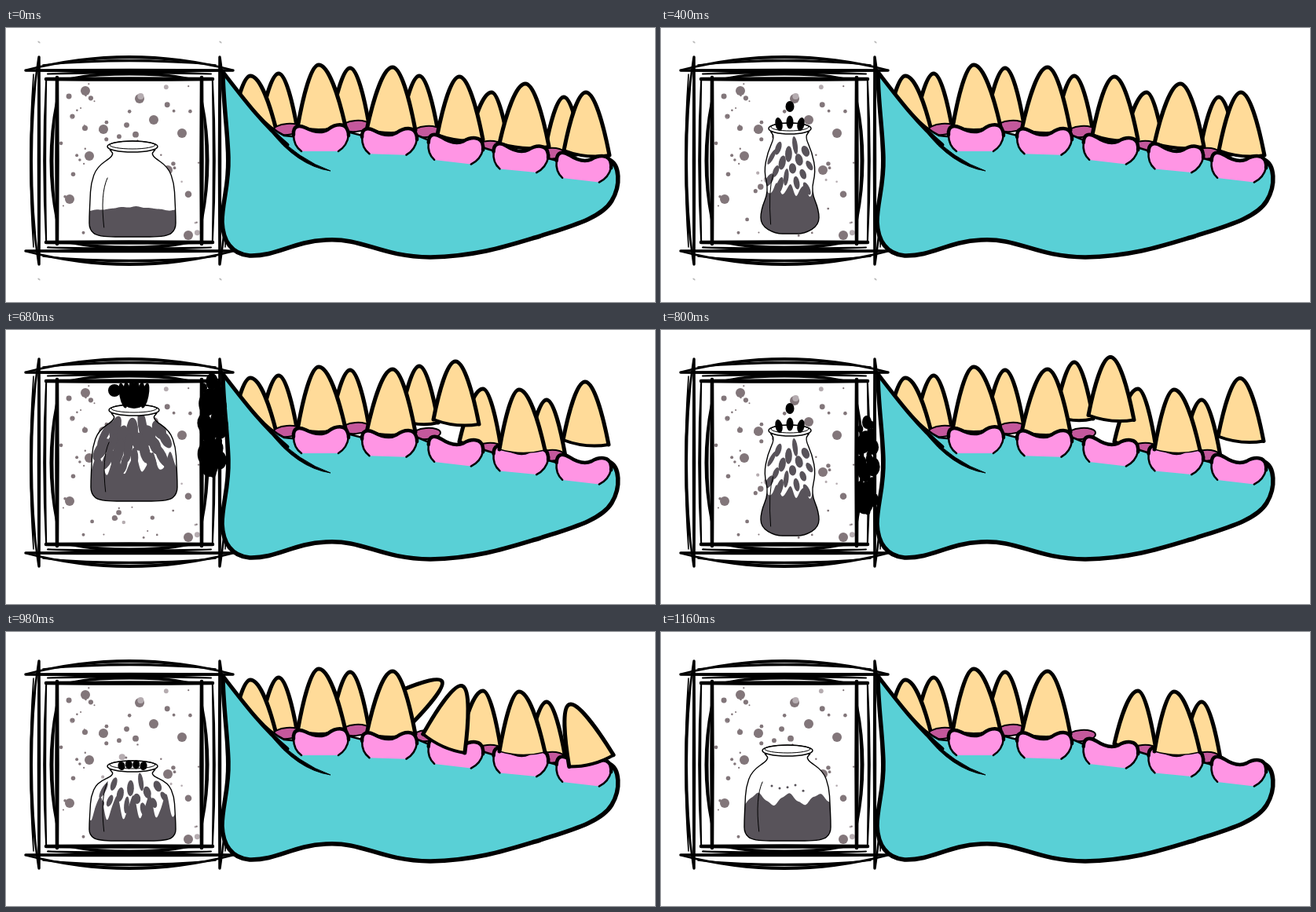
These frames come from a looping animation (826x349 px, 1.29 s). An HTML page with a canvas:

```html
<!DOCTYPE html>
<html>
<head>
<meta charset="utf-8">
<style>
html, body { margin: 0; width: 100%; height: 100%; overflow: hidden; background: #fff; }
canvas { display: block; }
</style>
</head>
<body>
<canvas id="stage" width="826" height="349"></canvas>
<script>
const g = document.getElementById('stage').getContext('2d');
const LOOP = 1290;
const BLUE = '#59d0d6', IVORY = '#ffdb99', PINK = '#ff95e4', PLUM = '#c4589c';
const LIQUID = '#58535a', SPECK = '#82767a', PALE = '#b5acb0';

const lerp = (a, b, u) => a + (b - a) * u;
const random = n => {
  const v = Math.sin(n * 12.9898) * 43758.5453;
  return v - Math.floor(v);
};

// Keys are [step, ...values]; the values between them are interpolated.
function track(step, keys) {
  const next = keys.findIndex(key => step <= key[0]);
  if (next < 1) return keys[next ? keys.length - 1 : 0].slice(1);
  const a = keys[next - 1], b = keys[next];
  const u = (step - a[0]) / (b[0] - a[0]);
  return a.slice(1).map((v, n) => lerp(v, b[n + 1], u));
}

function paint(path, fill, line, width = 5) {
  if (fill) { g.fillStyle = fill; g.fill(path); }
  if (line) { g.strokeStyle = line; g.lineWidth = width; g.stroke(path); }
}

function blob(x, y, rx, ry = rx, turn = 0, color = '#000') {
  g.fillStyle = color;
  g.beginPath();
  g.ellipse(x, y, rx, ry, turn, 0, 7);
  g.fill();
}

// A curved stroke that swells by "swell" in the middle; its ends are "tip" wide.
function brush(x1, y1, cx, cy, x2, y2, swell, tip = 2) {
  const len = Math.hypot(x2 - x1, y2 - y1);
  const nx = -(y2 - y1) / len * swell, ny = (x2 - x1) / len * swell;
  const p = new Path2D();
  p.moveTo(x1, y1);
  p.quadraticCurveTo(cx + nx, cy + ny, x2, y2);
  p.quadraticCurveTo(cx - nx, cy - ny, x1, y1);
  paint(p, '#000', '#000', tip);
}

function smooth(path, pts) {
  for (let i = 0; i < pts.length - 1; i++) {
    const [x, y] = pts[i], [p, q] = pts[i + 1];
    path.quadraticCurveTo(x, y, (x + p) / 2, (y + q) / 2);
  }
  path.lineTo(...pts[pts.length - 1]);
}

/* ---------- picture box ---------- */

const BIG_SPECKS = [[101, 80], [170, 90], [188, 117], [124, 129], [224, 134], [106, 163],
  [206, 181], [81, 218], [232, 264]];

function drawSpecks() {
  for (const [x, y] of BIG_SPECKS) blob(x, y, 6, 6, 0, SPECK);
  for (let i = 1; i <= 75; i++) {
    const r = 1 + 3.5 * random(i + 300) ** 3;
    blob(lerp(70, 246, random(i)), lerp(71, 266, random(i + 150)), r, r, 0, i % 5 ? SPECK : PALE);
  }
}

// One wall seen as the top one: y is the distance from the middle of the box.
function drawWall(turn, inner, bow) {
  const line = (y, reach, bend, swell, tip) => brush(-reach, -y, 0, -y - bend, reach, -y, swell, tip);
  g.save();
  g.translate(157, 169);
  g.rotate(turn);
  line(115, 132, 0, 1, 3.5);
  line(116, 130, bow * 2, 2, 2);
  line(122, 110, bow * 0.7, 2, 1.5);
  line(inner, 106, 0, 1, 4.5);
  line(inner + 1, 75, 12, 3, 2);
  line(lerp(inner, 115, 0.6), 104, 4, 2, 2);
  g.restore();
}

function drawBox(step) {
  for (let side = 0; side < 4; side++)
    drawWall(side * Math.PI / 2, side % 2 ? 92 : 104, side % 2 ? 9 : 16);
  if (step < 1) {
    for (const x of [42, 273])
      for (const y of [18, 320]) blob(x, y, 2, 1, 0.7, '#bbb');
  }
}

/* ---------- jar ---------- */

// The surface is a wave around "level" that peaks in the middle and every "gap" pixels.
const REST = { cx: 161, lip: 149, bottom: 266, rim: 32, shoulder: 53, waist: 54, hip: 55, round: 0.8,
  level: 230, wave: 3, gap: 110 };
const SETTLING = { ...REST, level: 213, wave: 9, gap: 39, drops: 5 };
const SQUASH = { ...REST, lip: 169, level: 239, wave: 2 };
const LANDED = { ...SQUASH, level: 223, wave: 19, gap: 21, drips: 15, fat: 4, nubs: 4, rise: 1 };
const STRETCH = { cx: 164, lip: 126, bottom: 262, rim: 27, shoulder: 33, waist: 27, hip: 37, round: 0.5,
  level: 206, wave: 9, gap: 17, drips: 18, fat: 4, nubs: 3, rise: 6 };
const TOP = { ...REST, cx: 163, lip: 100, bottom: 218, level: 170, wave: 15, gap: 23,
  drips: 22, fat: 7, nubs: 6, rise: 19 };

function jarState(t, step) {
  if (t < 200) return [REST, 0];
  if (t < 400) return [SQUASH, 0];
  if (step > 22) return [SETTLING, 0];
  if (step > 16) return [LANDED, 0];
  return [[STRETCH, 0], [TOP, 10], [TOP, 0], [TOP, 8], [STRETCH, 0], [LANDED, 0]][step % 6];
}

function jarOutline({ cx, lip, bottom, rim, shoulder, waist, hip, round }) {
  const at = u => lerp(lip, bottom, u);
  const half = [[rim * 0.9, lip + 6], [rim * 0.72, lip + 13], [shoulder * 0.86, at(0.24)],
    [shoulder, at(0.42)], [waist, at(0.6)], [hip, at(0.78)], [hip, at(0.92)],
    [hip * round, bottom], [0, bottom]];
  const path = new Path2D();
  path.moveTo(cx + half[0][0], half[0][1]);
  smooth(path, half.map(([r, y]) => [cx + r, y]));
  smooth(path, half.reverse().map(([r, y]) => [cx - r, y]));
  path.closePath();
  return path;
}

function drawLiquid({ cx, lip, bottom, shoulder, level, wave, gap, drips = 0, fat, drops = 0 }) {
  const surface = new Path2D();
  surface.moveTo(cx - 60, bottom + 5);
  for (let dx = -60; dx <= 60; dx++) {
    const uneven = 0.75 + 0.25 * Math.sin(dx * 0.31);
    surface.lineTo(cx + dx, level - wave * uneven * Math.cos(dx / gap * 2 * Math.PI));
  }
  surface.lineTo(cx + 60, bottom + 5);
  paint(surface, LIQUID);
  for (let i = 0; i < drips; i++) {
    const dx = ((i * 0.618) % 1 - 0.5) * 1.7 * shoulder;
    const y = lerp(lip + 18, level + 4, (i + 0.5) / drips);
    blob(cx + dx, y, fat * lerp(0.6, 1.2, random(i + 7)), fat * lerp(1.5, 3, random(i + 40)),
      -dx / shoulder * 0.7, LIQUID);
  }
  for (let i = 0; i < drops; i++)
    blob(cx - 20 + i * 10, level - 8 - 16 * random(i + 3), 1.5, 1.5, 0, LIQUID);
}

function drawSplash({ cx, lip, nubs = 0, rise }) {
  for (let i = 0; i < nubs; i++) {
    const u = i / (nubs - 1) - 0.5;
    blob(cx + u * 28, lip - rise + 5 * Math.abs(u), 4.5, 5 + rise * 0.6, u * 0.4);
  }
  if (rise > 3) blob(cx, lip - 26, 5.5, 7);
  if (rise > 10) {
    blob(cx, lip - 9, 13, 9);
    blob(cx - 25, lip - 23, 8, 8);
  }
}

function drawJar(pose, dy) {
  const { cx, lip, rim, hip, bottom } = pose;
  const body = jarOutline(pose);
  g.save();
  g.translate(0, dy);
  paint(body, '#fff');
  g.save();
  g.clip(body);
  drawLiquid(pose);
  g.restore();
  paint(body, null, '#000', 1.4);

  const ring = new Path2D();
  ring.ellipse(cx, lip + 2, rim, 7, 0, 0, 7);
  paint(ring, '#fff', '#000', 1.5);
  const mouth = new Path2D();
  mouth.ellipse(cx, lip, rim - 3, 5, 0, 0, 7);
  paint(mouth, null, '#000', 1);
  const shine = new Path2D();
  shine.moveTo(cx - hip * 0.58, bottom - 75);
  shine.quadraticCurveTo(cx - hip * 0.75, bottom - 55, cx - hip * 0.66, bottom - 12);
  paint(shine, null, '#000', 1);
  drawSplash(pose);
  g.restore();
}

/* ---------- ink running down the wall ---------- */

function drawInk(step) {
  if (step < 4 || step > 16) return;
  const [head, tail, width] = track(step, [[4, 100, 62, 14], [8, 188, 58, 14], [16, 283, 165, 8]]);
  const count = 22;
  for (let i = 0; i < count; i++) {
    const r = width * (0.55 + 0.25 * Math.sin(i * 5.3));
    const y = lerp(tail + r, head - r * 1.4, i / (count - 1));
    blob(262 + Math.sin(i * 2.4) * width * 0.75, y, r, r * 1.4);
  }
  blob(259, head - 15, 11, 14);
}

/* ---------- jaw ---------- */

function tooth([x, y], { left = [-28, 74], right = [30, 80], turn = 0, base = 4 } = {}) {
  const [lx, ly] = left, [rx, ry] = right;
  const foot = [(lx + rx) / 2, (ly + ry) / 2 + 8];
  const sides = new Path2D();
  sides.moveTo(lx, ly);
  sides.bezierCurveTo(lx * 0.74, ly * 0.5, lx * 0.36, 0, 0, 0);
  sides.bezierCurveTo(rx * 0.36, 0, rx * 0.74, ry * 0.5, rx, ry);
  const sole = new Path2D();
  sole.moveTo(lx, ly);
  sole.quadraticCurveTo(...foot, rx, ry);
  const whole = new Path2D(sides);
  whole.quadraticCurveTo(...foot, lx, ly);

  g.save();
  g.translate(x, y + 40);
  g.rotate(turn);
  g.translate(0, -40);
  paint(whole, IVORY);
  paint(sole, null, '#000', base);
  paint(sides, null, '#000', 5);
  g.restore();
}

const GUM_EDGE = 'M-35-4C-36-15-29-17-20-13C-10-8 1-6 9-11C18-18 31-20 34-9C35-7 35-5 35-3';
const GUM = new Path2D(GUM_EDGE + 'C34 6 30 12 22 17L-25 17C-32 12-35 4-35-4Z');
const GUM_SIDES = new Path2D('M35-4C34 6 30 12 22 17M-25 17C-32 12-35 4-35-4');
const GUM_TOP = new Path2D(GUM_EDGE);

function gum(x, y, turn) {
  g.save();
  g.translate(x, y);
  g.rotate(turn);
  paint(GUM, PINK);
  paint(GUM_SIDES, null, '#000', 2.5);
  paint(GUM_TOP, null, '#000', 4.5);
  g.restore();
}

function backGum(x, y) {
  const p = new Path2D();
  p.ellipse(x, y, 18, 7, -0.08, 0, 7);
  paint(p, PLUM, '#000', 2);
}

const RIDGE = 'M276 56C300 86 327 124 354 137L401 142L438 133L488 146L524 137L572 157L606 152L655 167L690 166L735 178L768 168';
const RIM = 'C781 174 783 200 771 220C758 242 720 252 680 265C640 277 600 291 540 292' +
  'C475 291 455 267 407 270C365 272 345 291 310 290C287 288 276 271 275 247C275 222 284 200 283 165C282 130 276 90 276 56';
const JAW = new Path2D(RIDGE + RIM);
const JAW_TOP = new Path2D(RIDGE);
const JAW_RIM = new Path2D('M768 168' + RIM);
const FLAP = new Path2D('M276 56C300 87 326 122 358 149');

function drawJaw(step) {
  const falling = Math.max(0, step - 16);
  const fall = ([x, y], drift, rate) => [x + drift * falling, y + rate * falling ** 2];
  const slide = (x1, y1, x2, y2) => track(step, [[0, x1, y1], [4, x2, y2]]);
  const lift = (x1, y1, x2, y2, y3, y4) =>
    track(step, [[0, x1, y1], [4, x2, y2], [8, x2, y3], [16, x2, y4]]);
  const third = lift(577, 62, 572, 54, 40, 29);
  const fifth = lift(738, 82, 737, 76, 66, 57);
  const rear = lift(526, 61, 526, 50, 46, 36);
  const fourth = slide(661, 71, 653, 76);
  const small = { left: [-24, 68], right: [24, 72] };

  // back row
  tooth([347, 58], small);
  tooth([311, 61], { ...small, right: [34, 73] });
  tooth([438, 51], small);
  if (falling < 8) tooth(fall(rear, -2, 2.4), { ...small, turn: falling * 0.48 });
  tooth(slide(618, 82, 607, 75), { left: [-30, 67], right: [23, 75] });
  tooth(slide(710, 88, 688, 89), small);
  backGum(358, 129);
  backGum(445, 125);
  backGum(535, 132);
  backGum(613, 151);
  backGum(692, 160);

  // front row
  tooth([398, 47], { left: [-27, 80], right: [34, 78] });
  tooth([492, 50], { left: [-33, 80], right: [29, 80] });
  if (step < 1) tooth(fourth, { left: [-33, 76] });
  if (!falling) {
    tooth(third);
    tooth(fifth);
  }

  paint(JAW, BLUE);
  paint(JAW_TOP, null, '#000', 2.5);
  paint(JAW_RIM, null, '#000', 5.5);
  paint(FLAP, null, '#000', 5);
  brush(335, 129, 372, 172, 413, 182, 4, 1);
  gum(401, 140, 0);
  gum(488, 144, 0.03);
  gum(572, 154, 0.12);
  gum(655, 165, 0.1);
  gum(735, 177, 0.12);
  if (step >= 1) tooth(fourth, { left: [-25, 76], right: [33, 77], base: 1.5 });

  if (falling) {
    tooth(fall(third, -2, 9.4), { turn: falling * 0.16 });
    tooth(fall(fifth, -3, 8.2), { turn: falling * -0.18 });
  }
}

/* ---------- loop ---------- */

function stepAt(t) {
  if (t < 400) return -1;
  return t < 470 ? 0 : Math.min(24, 1 + Math.floor((t - 470) / 30));
}

function frame(now) {
  const t = now % LOOP;
  const step = stepAt(t);
  g.fillStyle = '#fff';
  g.fillRect(0, 0, 826, 349);
  g.lineCap = g.lineJoin = 'round';
  drawSpecks();
  drawJar(...jarState(t, step));
  drawBox(step);
  drawJaw(step);
  drawInk(step);
  requestAnimationFrame(frame);
}
requestAnimationFrame(frame);
</script>
</body>
</html>
```
